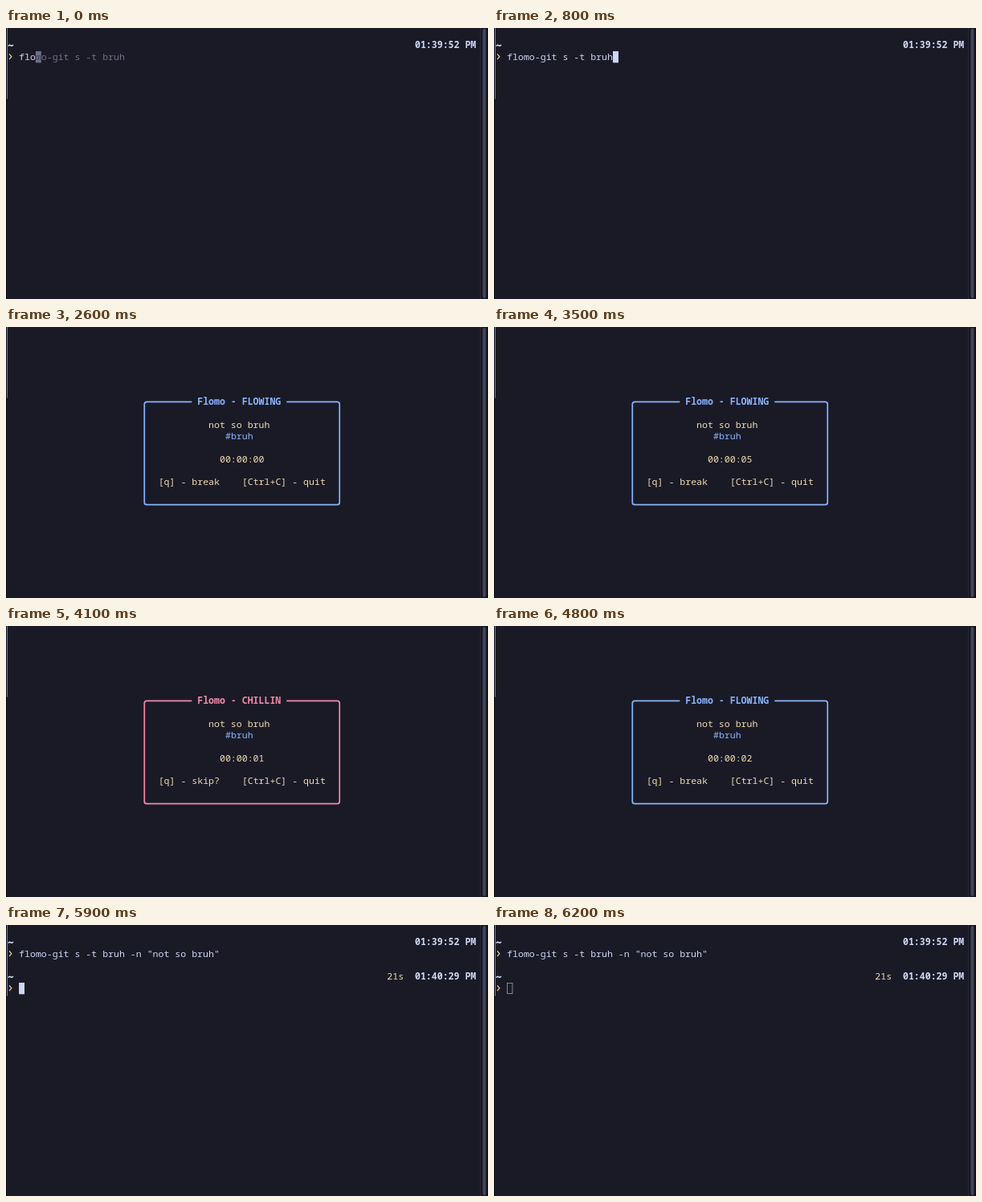
Write an HTML page with a canvas that moves like this. It is 600 px wide and 338 px high and loops after 6300 ms.

```html
<!DOCTYPE html>
<html lang="en">
<head>
<meta charset="utf-8">
<title>Terminal timer</title>
<style>
  html, body { margin: 0; width: 100%; height: 100%; overflow: hidden; background: #1a1a27; }
  canvas { display: block; width: 600px; height: 338px; }
</style>
</head>
<body>
<canvas id="stage"></canvas>
<script>
const W = 600, H = 338, LOOP = 6300;
const LEFT = 2.2, CELL = 6.942, ROW = 14.33;
const C = {
  bg: '#1a1a27', text: '#cdd6f4', ghost: '#6c7086', cursor: '#cdd6f4',
  yellow: '#f0dcae', blue: '#89b4fa', pink: '#f38ba8', edge: '#0e0e16'
};
const FONT = '11.57px "Noto Sans Mono", "DejaVu Sans Mono", monospace';
const COMMAND = 'flomo-git s -t bruh -n "not so bruh"';
const FIRST = 'flomo-git s -t bruh'.length;

// [time, typed characters]
const TYPING = [
  [0, 3], [400, 5], [500, 9], [600, 11], [700, 14], [800, 19], [900, 20], [1000, 21],
  [1100, 22], [1200, 23], [1300, 24], [1400, 26], [1700, 25], [1800, 24],
  [1900, 23], [2000, 25], [2100, 27], [2200, 29], [2300, 31], [2400, 34], [2500, 36]
];
// [time, mode, seconds]
const TIMER = [
  [2600, 'flow', 0], [2800, 'flow', 1], [2900, 'flow', 2], [3100, 'flow', 3],
  [3300, 'flow', 4], [3400, 'flow', 5], [3600, 'flow', 6], [3700, 'flow', 7],
  [3900, 'flow', 8], [4100, 'chill', 1], [4300, 'chill', 0], [4400, 'flow', 0],
  [4600, 'flow', 1], [4800, 'flow', 2], [4900, 'flow', 3], [5100, 'flow', 4],
  [5300, 'flow', 5], [5400, 'chill', 1], [5500, 'chill', 0], [5700, 'flow', 0],
  [5800, 'flow', 1]
];
const MODES = {
  flow: { title: 'FLOWING', color: C.blue, action: 'break' },
  chill: { title: 'CHILLIN', color: C.pink, action: 'skip?' }
};
const TIMER_START = 2600, QUIT = 5900, BLUR = 6200;

const canvas = document.getElementById('stage');
const ctx = canvas.getContext('2d');
const ratio = window.devicePixelRatio || 1;
canvas.width = Math.round(W * ratio);
canvas.height = Math.round(H * ratio);

const colX = col => LEFT + col * CELL;
const at = (steps, t) => steps.filter(step => step[0] <= t).pop();

function rect(x, y, w, h, color) {
  ctx.fillStyle = color;
  ctx.fillRect(x, y, w, h);
}

function text(str, col, row, color, bold) {
  ctx.font = (bold ? 'bold ' : '') + FONT;
  ctx.fillStyle = color;
  ctx.fillText(str, colX(col), 10.9 + row * ROW);
}

function cursor(col, row, color) {
  rect(colX(col), row * ROW + 0.3, CELL, ROW, color);
}

function hollowCursor(col, row) {
  ctx.strokeStyle = '#80869c';
  ctx.lineWidth = 1;
  ctx.strokeRect(colX(col) + 0.4, Math.round(row * ROW) + 0.5, CELL - 0.5, 13);
}

function tilde(row) {
  const y = row * ROW + 7.2;
  ctx.strokeStyle = C.text;
  ctx.lineWidth = 1.6;
  ctx.beginPath();
  ctx.moveTo(3, y + 1.2);
  ctx.bezierCurveTo(4.6, y - 3, 7, y + 3.6, 8.8, y - 0.8);
  ctx.stroke();
}

function chevron(row) {
  const y = row * ROW + 7.1;
  ctx.strokeStyle = '#e6cf98';
  ctx.lineWidth = 1.2;
  ctx.beginPath();
  ctx.moveTo(4, y - 3.4);
  ctx.lineTo(6.9, y);
  ctx.lineTo(4, y + 3.4);
  ctx.stroke();
}

function prompt(row, clock) {
  tilde(row);
  text(clock, 73, row, C.text, true);
  chevron(row + 1);
}

function drawTyping(t) {
  const count = at(TYPING, t)[1];
  const ghosted = count < FIRST;
  // A name is first begun without its quote, then erased.
  const typo = t >= 1300 && t < 1900;
  const typed = typo ? COMMAND.slice(0, 23) + 'not'.slice(0, count - 23) : COMMAND.slice(0, count);
  prompt(1, '01:39:52 PM');
  text(typed, 2, 2, C.text);
  cursor(2 + count, 2, ghosted ? C.ghost : C.cursor);
  if (ghosted) {
    text(COMMAND[count], 2 + count, 2, '#3b3d50');
    text(COMMAND.slice(count + 1, FIRST), 3 + count, 2, C.ghost);
  }
}

function drawFrame(color) {
  const l = colX(24.5), r = colX(59.5), top = 93.4, bottom = 221.7, rad = 3;
  ctx.strokeStyle = color;
  ctx.lineWidth = 1.7;
  ctx.beginPath();
  ctx.moveTo(colX(33), top);
  ctx.arcTo(l, top, l, bottom, rad);
  ctx.arcTo(l, bottom, r, bottom, rad);
  ctx.arcTo(r, bottom, r, top, rad);
  ctx.arcTo(r, top, l, top, rad);
  ctx.lineTo(colX(50), top);
  ctx.stroke();
}

function drawTimer(t) {
  const [, name, seconds] = at(TIMER, t);
  const mode = MODES[name];
  drawFrame(mode.color);
  text('Flomo - ' + mode.title, 34, 6, mode.color, true);
  text('not so bruh', 36, 8, C.yellow);
  text('#bruh', 39, 9, C.blue);
  text('00:00:' + String(seconds).padStart(2, '0'), 38, 11, C.yellow);
  text('[q] - ' + mode.action, 27, 13, C.yellow);
  text('[Ctrl+C] - quit', 42, 13, C.yellow);
}

function drawFinished(t) {
  prompt(1, '01:39:52 PM');
  text(COMMAND, 2, 2, C.text);
  prompt(4, '01:40:29 PM');
  text('21s', 68, 4, C.yellow);
  if (t < BLUR) cursor(2, 5, C.cursor);
  else hollowCursor(2, 5);
}

function drawWindow() {
  rect(0, 0, W, H, C.bg);
  rect(0, 0, 1, H, C.edge);
  rect(1, 0, 1, 88.5, '#5f80b8');
  rect(590, 0, 1, H, '#262635');
  rect(591, 0, 9, H, '#171722');
  ctx.fillStyle = '#434558';
  ctx.beginPath();
  ctx.roundRect(593.4, 1, 4, H - 2, 2);
  ctx.fill();
  rect(599, 0, 1, H, C.edge);
}

function render(now) {
  const t = now % LOOP;
  ctx.setTransform(ratio, 0, 0, ratio, 0, 0);
  drawWindow();
  if (t < TIMER_START) drawTyping(t);
  else if (t < QUIT) drawTimer(t);
  else drawFinished(t);
}

const start = performance.now();
function tick() {
  render(performance.now() - start);
  requestAnimationFrame(tick);
}
tick();
</script>
</body>
</html>
```
